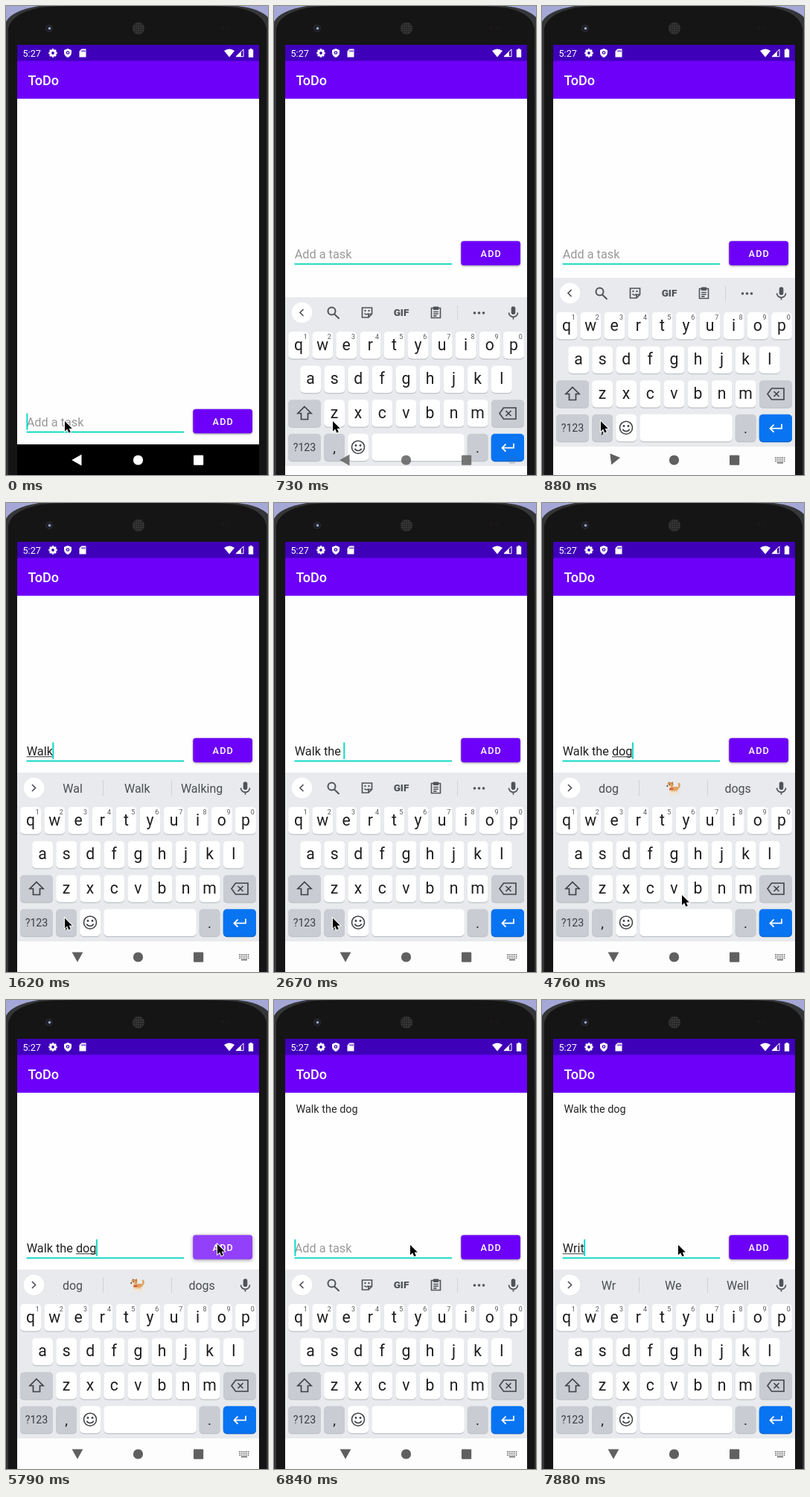
Recreate the animation shown at these times as an HTML page with a canvas. Size 352x628 px, loop 8000 ms.

```html
<!DOCTYPE html>
<html lang="en">
<head>
<meta charset="utf-8">
<title>ToDo</title>
<style>
html, body { margin: 0; width: 100%; height: 100%; overflow: hidden; background: #161616; }
canvas { display: block; }
</style>
</head>
<body>
<canvas id="stage" width="352" height="628"></canvas>
<script>
const c = document.getElementById('stage').getContext('2d');
const LOOP = 8000;
const FONT = 'Roboto, sans-serif';
const PURPLE = '#6d00f8', TEAL = '#10d9c6', GRAY = '#505357';

// Each step: [time, value]; "_" marks where the underlined word starts.
const typed = [
  [0, ''], [1320, '_W'], [1470, '_Wal'], [1620, '_Walk'], [1920, 'Walk _t'],
  [2070, 'Walk _th'], [2220, 'Walk _the'], [2670, 'Walk the '], [3410, 'Walk the o'],
  [3710, 'Walk the '], [3860, 'Walk the _d'], [4010, 'Walk the _do'],
  [4460, 'Walk the _dog'], [5800, ''], [7280, '_W'], [7580, '_Wr'],
  [7730, '_Wri'], [7880, '_Writ']
];
const hints = [
  [0, ''], [1470, 'W We Was'], [1620, 'Wal Walk Walking'], [1770, 'Walk Walks Walking'],
  [2070, 't to the'], [2220, 'the they them'], [2670, ''], [2970, 'world dog bus'],
  [3710, 'o of on'], [3860, 'world dog bus'], [4010, 'd dog day'],
  [4160, 'do dog down'], [4610, 'dog @ dogs'], [5800, ''],
  [7430, 'W We Well'], [7880, 'Wr We Well']
];
const caretOn = [[0, true], [290, false], [1030, true], [6390, false], [6840, true]];
const pointer = [
  [0, [79, 556]], [4610, [112, 553]], [4760, [188, 525]], [4910, [264, 432]],
  [5060, [328, 310]], [5210, [316, 279]], [5350, [284, 327]],
  [6240, [252, 329]], [6390, [204, 328]], [6540, [183, 328]]
];
const formShift = [[0, 225], [730, 0]];
const slide = [[0, 300], [730, 29], [880, 3], [1030, 0]];
const turn = [[0, 0], [880, 0.75], [1030, 1]];
const ripple = [[0, 0], [5650, 0.25], [5800, 0.16], [5940, 0]];

function at(steps, t) {
  let value = steps[0][1];
  for (const [time, v] of steps) if (t >= time) value = v;
  return value;
}

function box(x, y, w, h, color, r = 0) {
  c.fillStyle = color;
  c.beginPath();
  c.roundRect(x, y, w, h, r);
  c.fill();
}
function disc(x, y, r, color) {
  c.fillStyle = color;
  c.beginPath();
  c.arc(x, y, r, 0, 7);
  c.fill();
}
function text(s, x, y, size, color, align = 'left', weight = 400) {
  c.font = `${weight} ${size}px ${FONT}`;
  c.textAlign = align;
  c.fillStyle = color;
  c.fillText(s, x, y);
}
function fillPath(d, x, y, color) {
  c.save();
  c.translate(x, y);
  c.fillStyle = color;
  c.fill(new Path2D(d), 'evenodd');
  c.restore();
}
function strokePath(d, x, y, color, width) {
  c.save();
  c.translate(x, y);
  c.strokeStyle = color;
  c.lineWidth = width;
  c.stroke(new Path2D(d));
  c.restore();
}

function drawPhone() {
  box(0, 0, 352, 628, '#a5a8d6');
  fillPath('M0 628V21Q8 6 44 0H311Q340 3 352 15V628Z', 0, 0, '#343638');
  fillPath('M3 628V30Q7 10 46 2Q60 0 90 0H265Q300 0 315 3Q346 10 350 30V628Z', 0, 0, '#151515');
  disc(58, 30, 5, '#292a2d');
  disc(58, 30, 3.4, '#181b28');
  disc(58.5, 30, 1.8, '#a3a9c2');
  disc(178, 30, 8.5, '#252525');
  for (let y = -6; y <= 6; y += 3)
    for (let x = -6; x <= 6; x += 3)
      if (x * x + y * y < 60) disc(178 + x, 30 + y, 0.9, '#444');
  disc(291, 29, 2.5, '#1d1719');
  disc(300, 29, 2.5, '#1b1718');
}

function drawStatus() {
  const white = '#fff', back = '#3f00ba';
  box(15, 52, 325, 22, back);
  text('5:27', 22.5, 67.5, 12.66, white);
  for (let i = 0; i < 8; i++) {
    c.save();
    c.translate(63, 63);
    c.rotate(i * Math.PI / 4);
    box(-1.4, -5.7, 2.8, 3, white);
    c.restore();
  }
  disc(63, 63, 4.3, white);
  disc(63, 63, 1.9, back);
  fillPath('M0-6L5-4V0Q4.5 4 0 6Q-4.5 4-5 0V-4Z', 83, 63, white);
  disc(83, 62.5, 2.3, back);
  disc(83, 62.5, 1.1, white);
  fillPath('M-1.5-5.5H4.5V5.5H-4.5V-2.5ZM-1.5-3.8H-.4V-1.6H-1.5ZM.5-3.8H1.6V-1.6H.5ZM2.4-3.8H3.5V-1.6H2.4Z', 103, 63, white);
  fillPath('M0 5.5L-7-3Q0-8 7-3Z', 300, 63, white);
  strokePath('M-5 4.7L5-5V4.7Z', 314, 63, white, 1);
  fillPath('M-5.5 5L2-2.5V5Z', 314, 63, white);
  fillPath('M-1.3-6H1.3V-4.8H3.2V5.8H-3.2V-4.8H-1.3Z', 329, 63, white);
}

function drawButton(t) {
  c.save();
  c.shadowColor = 'rgba(0,0,0,.4)';
  c.shadowBlur = t >= 5650 && t < 5940 ? 5 : 3;
  c.shadowOffsetY = 1;
  box(251.3, 314.7, 79.7, 32.5, PURPLE, 3.6);
  c.restore();
  const glow = at(ripple, t);
  if (glow) box(251.3, 314.7, 79.7, 32.5, `rgba(255,255,255,${glow})`, 3.6);
  c.letterSpacing = '1.13px';
  text('ADD', 291.8, 335.7, 12.66, '#fff', 'center', 500);
  c.letterSpacing = '0px';
}

function drawForm(t) {
  const [plain, marked = ''] = at(typed, t).split('_');
  const line = plain + marked;
  c.save();
  c.translate(0, at(formShift, t));
  text(line || 'Add a task', 27.7, 337.8, 16.27, line ? '#202020' : '#999');
  const width = s => c.measureText(s).width;
  const end = line ? 27.7 + width(line) : 28;
  if (marked) box(27.7 + width(plain), 339.3, width(marked), 1, '#333');
  box(27.5, 344.4, 211.5, 2, TEAL);
  if (at(caretOn, t)) box(end - 0.6, 320.5, 2, 22.3, TEAL);
  drawButton(t);
  c.restore();
}

function drawApp(t) {
  box(15, 124, 325, 504, '#fefefe');
  box(15, 73.5, 325, 50.8, PURPLE);
  text('ToDo', 29.5, 105.8, 18.08, '#fff', 'left', 500);
  if (t >= 5800) text('Walk the dog', 29.4, 151, 14.46, '#262626');
  drawForm(t);
}

function key(x, y, w, color = '#fff', edge = '#bfc2c7') {
  box(x, y + 1, w, 36.5, edge, 5);
  box(x, y, w, 36.3, color, 5);
}

function drawDog(x, y) {
  const tan = '#e0a060', cream = '#f6e3cb';
  strokePath('M6 0Q10-3 7-7', x, y, tan, 2.4);
  box(x - 5, y - 2, 12, 7, tan, 3);
  strokePath('M-3 3V8.5M0 3V8M3 3V8M6 2V8.5', x, y, cream, 2);
  disc(x - 4, y - 4, 4, tan);
  disc(x - 6, y - 2.5, 2.5, cream);
  fillPath('M-7-6L-6-9L-3.5-7ZM-3-7L-.5-9L0-4Z', x, y, '#b87333');
  box(x - 5, y + 0.3, 5, 1.5, '#d33b34');
  disc(x - 5, y - 4.5, 0.8, '#333');
  disc(x - 8, y - 3, 1, '#4a332b');
}

function drawStrip(words) {
  disc(37.5, 381.5, 13.7, '#fff');
  strokePath(words ? 'M-2.5-4.5L2 0L-2.5 4.5' : 'M2-4.5L-2.5 0L2 4.5', 37.5, 381.5, GRAY, 1.7);
  if (words) {
    words.split(' ').forEach((word, i) => {
      const x = 89.5 + i * 86.8;
      if (word === '@') drawDog(x, 382);
      else text(word, x, 387.8, 16, '#4b4e52', 'center');
    });
    box(130, 371, 1, 21, '#cfd2d6');
    box(222, 371, 1, 21, '#cfd2d6');
  } else {
    strokePath('M3-2A5 5 0 1 1-7-2A5 5 0 1 1 3-2M1.5 2L8 8.2', 79.5, 381.5, GRAY, 2);
    strokePath('M-6.5-6.5H6.5V2L2 6.5H-6.5ZM6.5 2H2V6.5M-3.5 1Q-1 4 2 1', 125, 381.5, GRAY, 1.7);
    disc(122.5, 379, 1.2, GRAY);
    disc(127.5, 379, 1.2, GRAY);
    text('GIF', 171, 386, 13.5, GRAY, 'center', 900);
    strokePath('M-6-6H6V7H-6ZM-3.3-1H3.3M-3.3 1.7H3.3M-3.3 4.4H1', 217.5, 381.5, GRAY, 1.6);
    box(213.8, 373.5, 7.4, 4.5, GRAY, 1);
    box(246, 372, 1, 20, '#cfd2d6');
    for (const x of [269.5, 275.5, 281.5]) disc(x, 382, 1.8, GRAY);
  }
  box(318.7, 373.3, 5.6, 10.7, GRAY, 2.8);
  strokePath('M-6 0A6 5.8 0 0 0 6 0M0 5.5V9', 321.5, 381.5, GRAY, 1.7);
}

function drawKeyboard(t) {
  const ink = '#1f1f22', icon = '#3f4246', soft = '#c9ccd2';
  c.save();
  c.beginPath();
  c.rect(15, 361, 325, 267);
  c.clip();
  c.translate(0, at(slide, t));
  box(15, 361, 325, 226, '#e8eaed');
  box(15, 587, 325, 41, '#fdfdfd');
  drawStrip(at(hints, t));

  const row = (letters, first, y, digits) => [...letters].forEach((ch, i) => {
    const x = first + i * 32.1;
    key(x - 13.8, y, 27.8);
    text(ch, x, y + 24.5, 21.2, ink, 'center');
    if (digits) text((i + 1) % 10, x + 9.3, y + 9.8, 9, '#55585c', 'center');
  });
  row('qwertyuiop', 33, 407, true);
  row('asdfghjkl', 49, 452.7, false);
  row('zxcvbnm', 81, 498.2, false);

  key(19, 498.2, 44, soft);
  strokePath('M0-9L9 0H4.5V8H-4.5V0H-9Z', 41, 516.5, icon, 1.7);
  key(292, 498.2, 44, soft);
  strokePath('M-11 0L-5.5-7.5H11V7.5H-5.5ZM-2.5-3.5L4.5 3.5M4.5-3.5L-2.5 3.5', 314, 516.5, icon, 1.6);

  key(19, 543.7, 44, soft);
  text('?123', 41, 567, 14.2, '#3a3d41', 'center');
  key(67.2, 543.7, 27.8, soft);
  text(',', 81, 568.5, 19, ink, 'center');
  key(99.2, 543.7, 27.8);
  strokePath('M8.5 0A8.5 8.5 0 1 1-8.5 0A8.5 8.5 0 1 1 8.5 0M-4.6 2A5 4.5 0 0 0 4.6 2', 113, 561.7, icon, 1.6);
  disc(110, 559.5, 1.4, icon);
  disc(116, 559.5, 1.4, icon);
  key(131.3, 543.7, 124.5);
  key(259.7, 543.7, 27.8, soft);
  text('.', 273.6, 568.5, 19, ink, 'center');
  key(291.8, 543.7, 44.2, '#0874f2', '#0b63cb');
  strokePath('M8-5V1H-7M-2.5-4L-7.5 1L-2.5 6', 314, 561.7, '#fff', 1.8);
  c.restore();
}

function drawNav(t) {
  const open = t >= 730;
  if (!open) box(15, 587, 325, 41, '#000');
  const color = open ? '#606060' : '#fff';
  const turned = at(turn, t);
  c.save();
  c.globalAlpha = open && t < 880 ? 0.85 : 1;
  c.save();
  c.translate(95 + turned, 608);
  c.rotate(-turned * Math.PI / 2);
  fillPath('M-6.7 0L6.5-7.4V7.4Z', 0, 0, color);
  c.restore();
  disc(177.5, 608, 6.6, color);
  box(252, 601.5, 13.2, 13.2, color, 1);
  if (t >= 440) {
    c.globalAlpha = open && t < 880 ? 0.35 : 1;
    for (let y = 0; y < 3; y++)
      for (let x = 0; x < 6; x++) box(313 + x * 2.4, 604 + y * 2.4, 1.4, 1.4, color);
    box(316, 611, 8, 1.4, color);
  }
  c.restore();
}

function drawPointer([x, y]) {
  const d = 'M0 0V13.5L3.2 10.6L5.3 15.6L7.8 14.5L5.7 9.7H9.8Z';
  strokePath(d, x, y, '#fff', 1.8);
  fillPath(d, x, y, '#000');
}

function draw(t) {
  drawPhone();
  drawStatus();
  drawApp(t);
  if (t >= 730) drawKeyboard(t);
  drawNav(t);
  drawPointer(at(pointer, t));
}

function tick() {
  draw(performance.now() % LOOP);
  requestAnimationFrame(tick);
}
tick();
</script>
</body>
</html>
```
